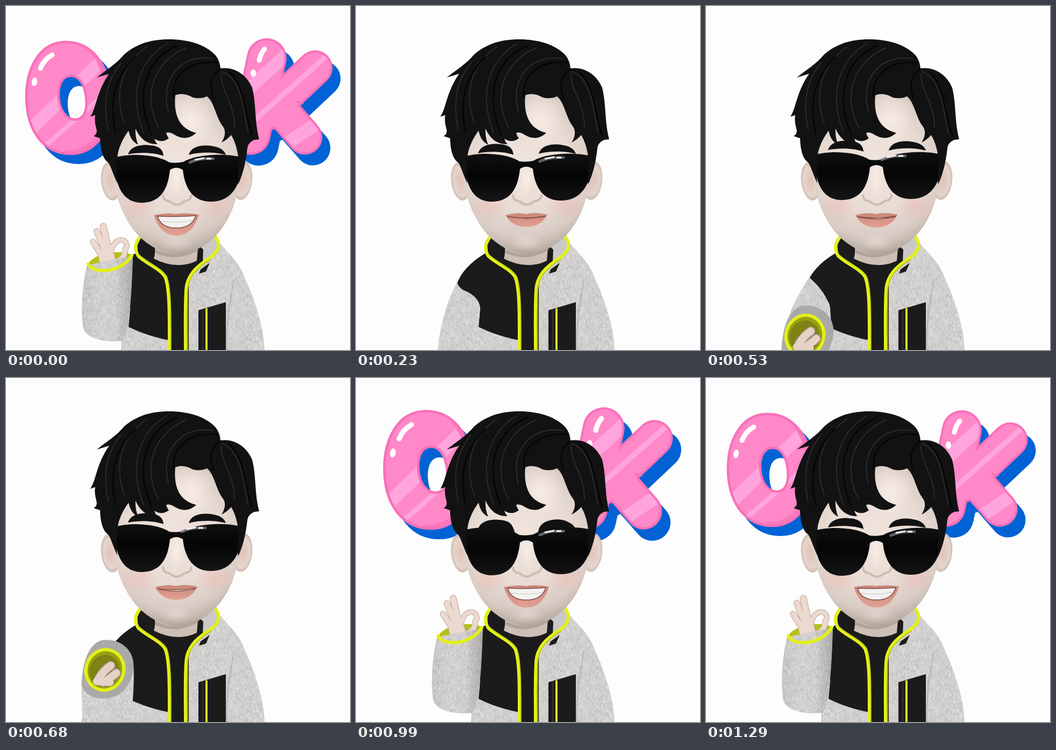
Animation, 640 px wide and 640 px high, one loop 1.37 s. Source, as an HTML page:

```html
<!DOCTYPE html>
<html lang="en">
<head>
<meta charset="utf-8">
<title>OK</title>
<style>
html, body { margin: 0; width: 100%; height: 100%; overflow: hidden; background: #fdfdfd; }
svg { display: block; width: 100vw; height: 100vh; }
.line { fill: none; stroke-linecap: round; stroke-linejoin: round; }
.pink { stroke: #f970b8; }
.trim { stroke: #e2f018; stroke-width: 6; }
.dark { fill: #1b1b1b; }
.hair { fill: #121213; }
.fleece { fill: url(#fleece); }
</style>
</head>
<body>
<svg viewBox="0 0 640 640">
<defs>
  <pattern id="fleece" width="80" height="80" patternUnits="userSpaceOnUse">
    <rect width="80" height="80" fill="#d1d0ce"/>
    <path id="fuzzDark" class="line" stroke="#a9a8a6" stroke-width="1.1" opacity=".5"/>
    <path id="fuzzLight" class="line" stroke="#e6e6e4" stroke-width="1.4" opacity=".7"/>
  </pattern>
  <radialGradient id="skin" gradientUnits="userSpaceOnUse" cx="310" cy="295" r="172">
    <stop offset="0" stop-color="#f0e4dd"/>
    <stop offset=".5" stop-color="#e8dcd4"/>
    <stop offset=".78" stop-color="#d9ccc4"/>
    <stop offset=".93" stop-color="#bdb0a7"/>
    <stop offset="1" stop-color="#a4978e"/>
  </radialGradient>
  <radialGradient id="ear">
    <stop offset=".2" stop-color="#e2c6bc"/>
    <stop offset=".75" stop-color="#e5d5cc"/>
    <stop offset="1" stop-color="#cbbbb1"/>
  </radialGradient>
  <radialGradient id="blush">
    <stop offset="0" stop-color="#f0b8b0" stop-opacity=".5"/>
    <stop offset="1" stop-color="#f0b8b0" stop-opacity="0"/>
  </radialGradient>
  <radialGradient id="glow">
    <stop offset="0" stop-color="#fbf0ea" stop-opacity=".8"/>
    <stop offset="1" stop-color="#fbf0ea" stop-opacity="0"/>
  </radialGradient>
  <linearGradient id="lens" x2="0" y2="1">
    <stop offset="0" stop-color="#101011"/>
    <stop offset=".45" stop-color="#050505"/>
    <stop offset="1" stop-color="#151516"/>
  </linearGradient>
  <linearGradient id="lip" x2="0" y2="1">
    <stop offset="0" stop-color="#c98678"/>
    <stop offset="1" stop-color="#e3a195"/>
  </linearGradient>
  <linearGradient id="fold">
    <stop offset="0" stop-color="#707074" stop-opacity=".12"/>
    <stop offset=".3" stop-color="#707074" stop-opacity="0"/>
    <stop offset=".65" stop-color="#707074" stop-opacity="0"/>
    <stop offset="1" stop-color="#707074" stop-opacity=".4"/>
  </linearGradient>

  <path id="oShape" fill-rule="evenodd" d="M108 67C60 69 36 120 38 175C40 235 72 275 120 275C168 275 198 230 195 170C192 110 160 65 108 67ZM118 130C101 132 95 154 99 178C103 200 116 213 132 211C149 208 152 187 148 163C144 142 134 128 118 130Z"/>
  <g id="kOuter" class="line">
    <path stroke-width="74" d="M485 97L455 240"/>
    <path stroke-width="65" d="M575 115L485 200M500 180L556 244"/>
  </g>
  <g id="kInner" class="line">
    <path stroke-width="66" d="M485 97L455 240"/>
    <path stroke-width="57" d="M575 115L485 200M500 180L556 244"/>
  </g>
  <mask id="oMask" maskUnits="userSpaceOnUse" x="0" y="0" width="640" height="640"><use href="#oShape" fill="#fff"/></mask>
  <mask id="kMask" maskUnits="userSpaceOnUse" x="0" y="0" width="640" height="640"><use href="#kInner" stroke="#fff"/></mask>
</defs>

<g id="letters">
  <g id="letterO">
    <use href="#oShape" x="15" y="17" fill="#0062d4" stroke="#0062d4" stroke-width="4"/>
    <use href="#oShape" fill="#ff88c8"/>
    <g mask="url(#oMask)">
      <path class="line" stroke="#ffa4dc" stroke-width="24" d="M35 240L195 85"/>
      <path class="line" stroke="#ffa4dc" stroke-width="9" d="M68 264L200 150"/>
      <path class="line" stroke="#fb78bd" stroke-width="9" d="M150 72C212 130 205 275 110 273"/>
    </g>
    <use href="#oShape" fill="none" class="pink" stroke-width="4.5"/>
    <path class="line" stroke="#fff" stroke-width="9" d="M64 116Q71 99 86 91"/>
    <ellipse cx="53" cy="141" rx="5" ry="8" fill="#fff" transform="rotate(10 53 141)"/>
  </g>
  <g id="letterK">
    <use href="#kOuter" x="15" y="20" stroke="#0062d4"/>
    <use href="#kOuter" class="pink"/>
    <use href="#kInner" stroke="#ff88c8"/>
    <g mask="url(#kMask)" class="line" stroke="#ffa4dc">
      <path stroke-width="24" d="M425 178L535 78M495 275L605 200"/>
      <path stroke-width="10" d="M440 232L600 90"/>
    </g>
    <path class="line pink" stroke-width="3" d="M552 181L541 178"/>
    <path class="line" stroke="#fff" stroke-width="9" d="M471 101Q474 88 481 80"/>
    <ellipse cx="460" cy="125" rx="5" ry="7" fill="#fff"/>
  </g>
</g>

<g id="torso">
  <path class="fleece" d="M385 425C402 450 430 470 442 500C462 545 480 595 481 640H334V500Z"/>
  <path class="fleece" d="M230 580L215 606L214 640H304V560Z"/>
  <path class="line" stroke="#8b8a88" stroke-width="3" opacity=".3" d="M424 510C416 550 409 600 411 640"/>
  <path fill="#cac9c8" d="M350 444L392 426L396 448L360 482Z"/>
  <path class="dark" d="M244 445L253 427L290 440H352L367 453L366 478L340 502V640H302V520L246 464Z"/>
  <path fill="#cdbfb6" d="M277 440Q278 462 275 470Q318 492 355 474L358 440Z"/>
  <path class="line" stroke="#8d8179" stroke-width="6" opacity=".45" d="M280 457Q318 474 356 452"/>
  <path class="dark" d="M362 490L379 478L372 494L359 498Z"/>
  <path class="dark" d="M244 458C220 472 198 490 188 516Q190 525 200 529Q228 540 231 562L228 597Q262 614 304 622V522C300 498 268 484 244 458Z"/>
  <path class="dark" d="M358 566L409 551V640H358Z"/>
  <path class="line" stroke="#d8e51c" stroke-width="4" d="M373 564V640"/>
  <path class="line" stroke="#4c4c4a" stroke-width="1" d="M366 565V640"/>
  <path class="line trim" d="M252 427C240 439 238 452 246 465C262 480 286 488 296 504C305 525 304 580 304 640M388 427C401 445 396 456 380 468C352 486 336 502 335 530C333 560 334 600 334 640"/>
  <path class="line" stroke="#aebb12" stroke-width="1.5" d="M248 463C264 478 288 486 299 503C308 525 307 580 307 640M381 471C355 488 339 504 338 530V640"/>
</g>

<path id="sleeveDown" class="fleece" d="M188 514Q192 526 203 530Q229 541 231 562L228 597L216 606L214 640H152C156 600 166 555 188 514Z"/>

<g id="armFront">
  <path class="fleece" d="M192 505C165 545 148 580 140 640H236L231 562Q222 530 192 505Z"/>
  <g id="reach">
    <path class="fleece" d="M140 640C142 600 152 566 178 558C206 553 234 570 237 600C240 640 234 680 230 760H144Z"/>
    <path fill="#9e9d9c" opacity=".75" d="M141 640C143 600 152 566 178 558C206 553 234 570 237 600C239 640 212 668 180 666C158 666 144 656 141 640Z"/>
    <g transform="rotate(18 184 613)">
      <ellipse cx="184" cy="613" rx="35" ry="38" fill="#98a010"/>
      <ellipse cx="184" cy="615" rx="28" ry="30" fill="#7d8414"/>
      <g class="line">
        <path stroke="#a98f83" stroke-width="17" d="M178 632Q182 614 192 602M188 636Q198 626 206 612"/>
        <path stroke="#e6d2c7" stroke-width="14" d="M178 632Q182 614 192 602M188 636Q198 626 206 612M176 638L200 632"/>
      </g>
      <ellipse cx="184" cy="613" rx="35" ry="38" class="line trim"/>
    </g>
  </g>
</g>

<g id="armUp">
  <path id="cuffIn" fill="#b5c016"/>
  <g id="hand" class="line">
    <g id="fingers">
      <path stroke-width="12" d="M178 464L162 439M184 456L169 419"/>
      <path stroke-width="13" d="M191 455L181 410"/>
      <path stroke-width="10" d="M196 456C200 431 225 429 225 448"/>
      <path stroke-width="11" d="M198 478C213 475 222 466 222 452"/>
      <path stroke-width="31" d="M187 466L191 482"/>
    </g>
  </g>
  <path id="sleeveUp" class="fleece"/>
  <path id="sleeveFold" fill="url(#fold)"/>
  <path id="cuff" class="line trim"/>
</g>

<g id="head">
  <ellipse cx="195" cy="326" rx="18" ry="36" fill="url(#ear)" transform="rotate(-7 195 326)"/>
  <ellipse cx="440" cy="325" rx="18" ry="36" fill="url(#ear)" transform="rotate(7 440 325)"/>
  <path fill="url(#skin)" d="M196 280C198 340 212 385 240 420C262 446 290 461 318 461C350 460 378 444 400 416C424 384 438 340 438 270L430 150H210Z"/>
  <ellipse cx="247" cy="372" rx="36" ry="30" fill="url(#blush)"/>
  <ellipse cx="390" cy="372" rx="36" ry="30" fill="url(#blush)"/>
  <ellipse cx="345" cy="210" rx="42" ry="52" fill="url(#glow)"/>
  <ellipse cx="317" cy="322" rx="13" ry="36" fill="url(#glow)"/>
  <ellipse cx="318" cy="440" rx="34" ry="16" fill="url(#glow)" opacity=".5"/>
  <path class="line" stroke="#b39a8e" stroke-width="4" opacity=".5" d="M292 352Q293 363 304 363Q318 376 332 363Q344 362 345 352"/>
  <g id="mouth">
    <path id="lips" fill="url(#lip)"/>
    <path id="teeth" fill="#f4f2f0" stroke="#7d4a42" stroke-width="1.4"/>
    <path id="bite" class="line" stroke="#c4bfbb" stroke-width="1"/>
  </g>
  <g id="brows" class="hair">
    <path d="M227 276C231 262 248 257 266 259C284 260 292 266 293 279C280 273 248 271 227 276Z"/>
    <path d="M340 277C344 262 362 258 380 260C396 262 406 267 409 277C390 272 362 271 340 277Z"/>
  </g>
  <g id="lids" class="hair">
    <path d="M226 290Q230 264 264 264Q292 265 296 290Z"/>
    <path d="M338 290Q342 263 376 263Q404 265 410 288Z"/>
  </g>
  <g id="glasses">
    <path fill="url(#lens)" d="M196 284C225 273 280 275 304 291Q317 293 330 290C352 276 410 272 444 283L439 302C433 342 414 364 381 364C350 364 333 342 329 305Q317 297 305 305C301 345 285 366 252 366C221 366 206 340 203 304Z"/>
    <g id="shine" class="line">
      <path stroke="#85858a" stroke-width="5" opacity=".7" d="M342 291Q362 282 386 284"/>
      <path stroke="#f4f4f4" stroke-width="3" d="M352 286L368 283M374 284L381 284"/>
    </g>
  </g>
  <path class="hair" d="M169 133C190 116 205 108 220 90C245 68 275 62 303 62C340 62 372 72 390 92Q398 102 399 116C425 112 448 128 458 152C466 185 462 212 471 248L462 249Q450 254 449 265C446 290 442 310 432 332Q430 320 433 295Q432 262 419 240Q411 249 401 254Q413 235 402 222C390 205 388 180 374 168Q362 174 347 170Q330 160 315 166C312 195 318 228 354 236Q335 254 311 238Q304 234 298 236Q300 243 303 246Q290 256 276 247Q278 254 282 257C260 258 248 244 241 228Q240 245 246 258Q232 252 228 232Q212 254 208 275Q204 305 207 330C198 310 196 300 190 291Q176 282 175 246L163 242Q171 238 168 228Q164 214 166 203L157 206C168 190 168 160 192 126Z"/>
  <g class="line" stroke="#2b2b2d" stroke-width="2">
    <path d="M214 106C186 140 180 180 190 230M262 76C215 110 200 160 220 218M300 70C250 98 226 160 256 236M335 78C272 104 254 170 284 226M385 98C330 88 285 130 302 196M402 122C436 135 440 180 450 235M400 126C400 160 425 180 425 225"/>
  </g>
  <g class="line" stroke="#060606" stroke-width="3">
    <path d="M240 95C205 130 190 175 204 235M318 74C262 98 238 160 270 238M394 105C340 100 308 130 312 168M398 118C380 130 378 150 386 172M415 122C445 150 442 195 458 240"/>
  </g>
</g>
</svg>

<script>
const $ = id => document.getElementById(id);
const LOOP = 1370;
const times = [0, 80, 150, 230, 300, 380, 460, 530, 610, 690, 760, 830, 910, 990, 1060, 1140, 1210, 1290];

// Tracks: [step, value] pairs, linear in between.
// Step 0 ends the gesture; step 1 cuts back to the resting pose.
const tracks = {
  oX: [[0, 0], [12, 52], [13, 19], [14, -14], [15, -6], [17, 3]],
  kX: [[0, 0], [12, -55], [13, -22], [14, 13], [15, -3], [17, -9]],
  size: [[0, 1], [12, 1.11], [13, 1.05], [14, 1.045], [15, .96], [17, 1]],
  glasses: [[0, 0], [1, -2], [3, -2], [7, -5], [11, -5], [13, 1], [15, 5], [17, 2]],
  brows: [[0, 0], [1, -2], [3, -2], [7, -8], [9, -6], [11, 3], [13, 5], [15, 5], [17, 2]],
  smile: [[0, 1], [1, 0], [6, 0], [7, .07], [11, .2], [13, 1]],
  shine: [[0, 0], [3, 0], [7, -15], [11, -16], [13, 0], [15, 6], [17, 2]],
  raise: [[0, 0], [8, 0], [9, .8], [10, 1], [11, 1], [12, .4], [13, 0]],
  drop: [[0, 0], [8, 0], [9, 25], [10, 0]],
  reach: [[6, 35], [7, 0], [8, -70]]
};

const sleeve = [
  'M151 482C143 510 138 570 144 600C150 618 180 627 216 623C232 600 234 520 236 465Z',
  'M164 440C156 465 143 510 144 560C144 590 180 608 224 613C234 590 238 510 240 451Z'];
const cuff = [
  'M153 480C162 500 216 496 234 464',
  'M165 439C180 448 215 452 239 450'];
const cuffIn = [
  cuff[0] + 'C225 453 165 456 153 480Z',
  cuff[1] + 'C225 440 180 434 165 439Z'];

function value(name, k) {
  const keys = tracks[name];
  const i = keys.findIndex(p => p[0] >= k);
  if (i < 0) return keys[keys.length - 1][1];
  if (i === 0) return keys[0][1];
  const [a, x] = keys[i - 1], [b, y] = keys[i];
  return x + (y - x) * (k - a) / (b - a);
}

function mix([a, b], u) {
  const to = b.match(/[\d.]+/g);
  let i = 0;
  return a.replace(/[\d.]+/g, n => (+n + (to[i++] - n) * u).toFixed(2));
}

const set = (id, name, v) => $(id).setAttribute(name, v);
const move = (id, x, y) => set(id, 'transform', `translate(${x} ${y})`);
const show = (id, on) => { $(id).style.display = on ? '' : 'none'; };
const zoom = (id, dx, s, x, y) =>
  set(id, 'transform', `translate(${x + dx} ${y}) scale(${s}) translate(${-x} ${-y})`);

function drawMouth(a) {
  const w = 3 * a, low = 411 + 16 * a;
  set('lips', 'd', `M${278 - w} 389Q300 ${383 + a} 316 387Q335 ${383 + a} ${356 + w} 388Q${344 + w} ${low} 317 ${low}Q${290 - w} ${low} ${278 - w} 389Z`);
  set('teeth', 'd', `M282 ${392 - a}Q317 ${397 - 4 * a} 353 ${391 - a}Q${351 - 5 * a} ${392 + 21 * a} 317 ${395 + 18 * a}Q${283 + 5 * a} ${392 + 21 * a} 282 ${392 - a}Z`);
  set('bite', 'd', a > .5 ? 'M289 400Q317 405 346 399' : '');
}

function draw(k) {
  const v = name => value(name, k);
  show('letters', k === 0 || k > 11);
  zoom('letterO', v('oX'), v('size'), 120, 172);
  zoom('letterK', v('kX'), v('size'), 530, 170);

  const up = k === 0 || k > 8, front = k > 5 && k < 9;
  show('armUp', up);
  show('armFront', front);
  show('sleeveDown', !up && !front);
  if (front) move('reach', 0, v('reach'));
  if (up) {
    const u = v('raise'), d = mix(sleeve, u);
    move('armUp', 0, v('drop'));
    set('sleeveUp', 'd', d);
    set('sleeveFold', 'd', d);
    set('cuff', 'd', mix(cuff, u));
    set('cuffIn', 'd', mix(cuffIn, u));
    set('hand', 'transform', `translate(${195 + 10 * u} ${470 - 25 * u}) rotate(${14 * u}) scale(${1 - .2 * u} 1) translate(-195 -470)`);
  }

  move('glasses', 0, v('glasses'));
  move('brows', 0, v('brows'));
  move('shine', v('shine'), 0);
  show('lids', k > 9 && k < 14);
  drawMouth(v('smile'));
}

// Each finger gets a shaded rim under a lighter core.
const rim = $('fingers'), core = rim.cloneNode(true);
core.removeAttribute('id');
rim.setAttribute('stroke', '#c0a598');
core.setAttribute('stroke', '#ecd9cf');
for (const p of core.children) p.setAttribute('stroke-width', p.getAttribute('stroke-width') - 2);
$('hand').append(core);

let seed = 7;
const rnd = n => (seed = seed * 16807 % 2147483647) / 2147483647 * n;
function fuzz(count) {
  let d = '';
  for (let i = 0; i < count; i++)
    d += `M${rnd(78).toFixed(1)} ${rnd(78).toFixed(1)}q${(rnd(6) - 3).toFixed(1)} ${rnd(4).toFixed(1)} ${(rnd(8) - 4).toFixed(1)} ${(2 + rnd(4)).toFixed(1)}`;
  return d;
}
set('fuzzDark', 'd', fuzz(150));
set('fuzzLight', 'd', fuzz(110));

let last = -1;
function tick() {
  const t = performance.now() % LOOP;
  const k = times.filter(s => s <= t).length - 1;
  if (k !== last) draw(last = k);
  requestAnimationFrame(tick);
}
tick();
</script>
</body>
</html>
```
